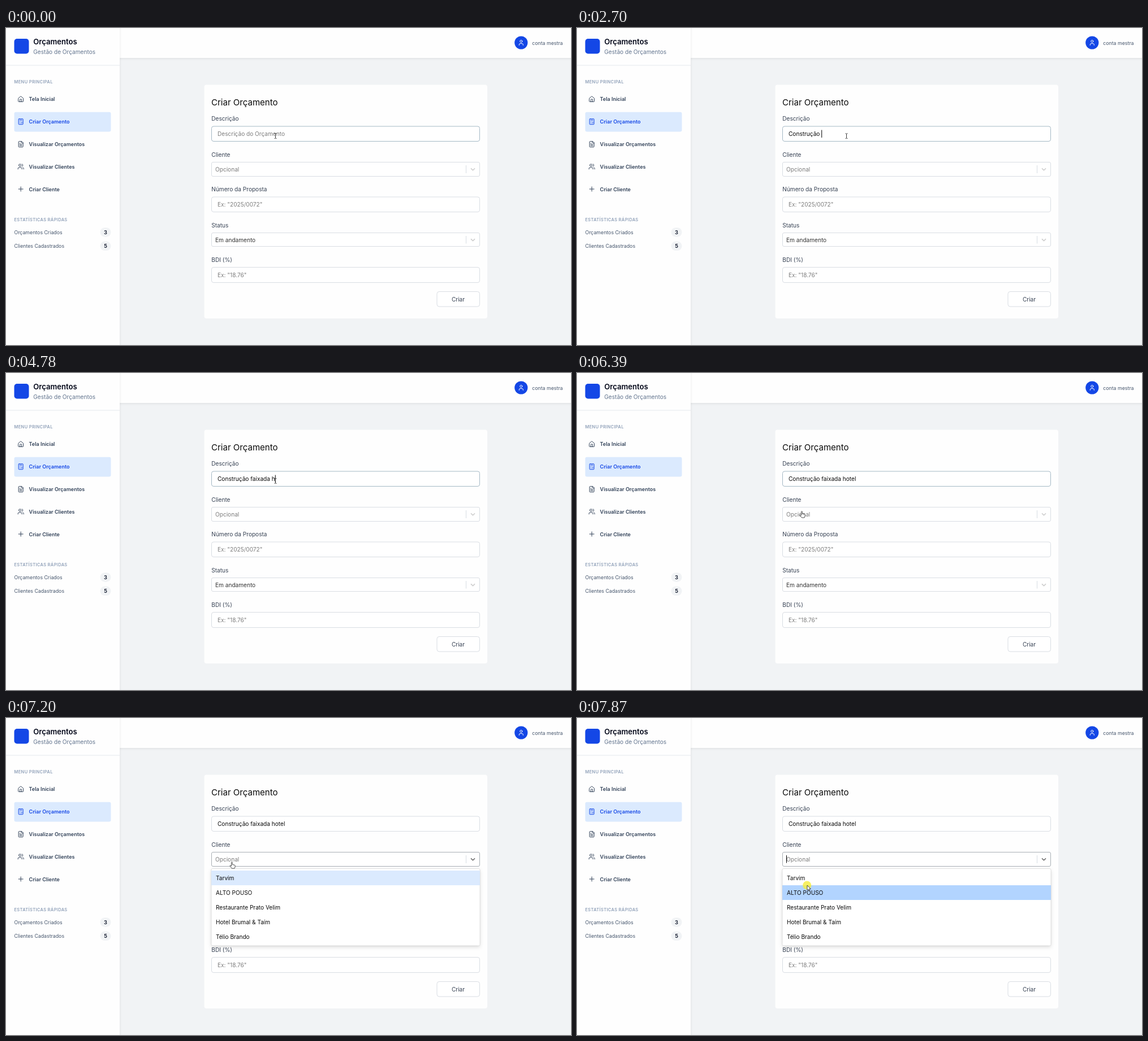
These frames come from a looping animation (999 by 561 pixels, 8000 ms). An HTML page:

```html
<!DOCTYPE html>
<html lang="pt-BR">
<head>
<meta charset="utf-8">
<title>Criar Orçamento</title>
<style>
  html, body { margin: 0; width: 100%; height: 100%; overflow: hidden; }
  svg { display: block; }
  text { font: 10.1px Inter, sans-serif; fill: #364153; white-space: pre; }
  .brand { font-size: 13.1px; font-weight: 600; fill: #020618; }
  .sub { fill: #62748e; }
  .head { font-size: 7.5px; font-weight: 600; letter-spacing: .33px; fill: #90a1b9; }
  .nav text { font-size: 9px; font-weight: 600; fill: #314158; }
  .nav .on { fill: #1447e6; }
  .small { font-size: 8.77px; fill: #45556c; }
  .count { font-size: 9.3px; font-weight: 600; fill: #0f172b; text-anchor: middle; }
  .title { font-size: 15.05px; fill: #0a0a0a; }
  .hint { fill: #7c7c7c; }
  .ink, #menu text { fill: #0a0a0a; }
  .icon { fill: none; stroke: #314158; stroke-width: 2; stroke-linecap: round; stroke-linejoin: round; }
  .box { fill: #fff; stroke: #d9dde3; }
  .chevron { fill: none; stroke: #ccc; stroke-width: 1.5; stroke-linecap: round; stroke-linejoin: round; }
  .pointer { fill: #fff; stroke: #222; stroke-width: .8; stroke-linejoin: round; }
</style>
</head>
<body>
<svg width="999" height="561" viewBox="0 0 999 561">
  <defs>
    <filter id="soft" x="-20%" y="-20%" width="140%" height="140%">
      <feDropShadow dx="0" dy="1" stdDeviation="2" flood-opacity=".09"/>
    </filter>
    <filter id="drop" x="-5%" y="-10%" width="110%" height="125%">
      <feDropShadow dx="0" dy="2.5" stdDeviation="3" flood-opacity=".13"/>
    </filter>
  </defs>

  <rect width="999" height="561" fill="#f1f3f5"/>
  <rect x="190" y="-10" width="830" height="63" fill="#fefefe" filter="url(#soft)"/>
  <rect x="-20" y="-20" width="221" height="601" fill="#fefefe" filter="url(#soft)"/>

  <rect x="14.5" y="19" width="26" height="26.5" rx="5" fill="#1447e6"/>
  <text class="brand" x="48.3" y="28.8">Orçamentos</text>
  <text class="sub" x="48.3" y="45.9">Gestão de Orçamentos</text>
  <path d="M0 66h201" stroke="#e5e8ec"/>

  <circle cx="910.8" cy="26" r="11.6" fill="#1447e6"/>
  <g class="icon" style="stroke:#fff" transform="translate(904.8 20) scale(.5)">
    <path d="M19 21v-2a4 4 0 0 0-4-4H9a4 4 0 0 0-4 4v2"/><circle cx="12" cy="7" r="4"/>
  </g>
  <text class="small" x="984.5" y="29.6" text-anchor="end">conta mestra</text>

  <text class="head" x="14.5" y="98.2">MENU PRINCIPAL</text>
  <rect x="14.5" y="148.7" width="171" height="34.8" rx="3" fill="#dbeafe"/>
  <g class="nav">
    <text x="40.6" y="129.3">Tela Inicial</text>
    <text x="40.6" y="169" class="on">Criar Orçamento</text>
    <text x="40.6" y="209.1">Visualizar Orçamentos</text>
    <text x="40.6" y="248.8">Visualizar Clientes</text>
    <text x="40.6" y="288.5">Criar Cliente</text>
  </g>
  <g class="icon">
    <path transform="translate(20.2 120) scale(.5)" d="M15 21v-8a1 1 0 0 0-1-1h-4a1 1 0 0 0-1 1v8M3 10a2 2 0 0 1 .7-1.5l7-6a2 2 0 0 1 2.6 0l7 6A2 2 0 0 1 21 10v9a2 2 0 0 1-2 2H5a2 2 0 0 1-2-2z"/>
    <path transform="translate(20.2 159.7) scale(.5)" stroke="#1447e6" d="M6 2h12a2 2 0 0 1 2 2v16a2 2 0 0 1-2 2H6a2 2 0 0 1-2-2V4a2 2 0 0 1 2-2zM8 6h8M16 14v4M16 10h.01M12 10h.01M8 10h.01M12 14h.01M8 14h.01M12 18h.01M8 18h.01"/>
    <path transform="translate(20.2 199.7) scale(.5)" d="M15 2H6a2 2 0 0 0-2 2v16a2 2 0 0 0 2 2h12a2 2 0 0 0 2-2V7zM14 2v4a2 2 0 0 0 2 2h4M10 9H8M16 13H8M16 17H8"/>
    <path transform="translate(20.2 239.3) scale(.5)" d="M16 21v-2a4 4 0 0 0-4-4H6a4 4 0 0 0-4 4v2M5 7a4 4 0 0 1 8 0a4 4 0 0 1-8 0M22 21v-2a4 4 0 0 0-3-3.9M16 3.1a4 4 0 0 1 0 7.8"/>
    <path transform="translate(20.2 279) scale(.5)" d="M4 12h16M12 4v16"/>
  </g>

  <text class="head" x="14.5" y="341.9">ESTATÍSTICAS RÁPIDAS</text>
  <text class="small" x="14.5" y="364.6">Orçamentos Criados</text>
  <text class="small" x="14.5" y="389">Clientes Cadastrados</text>
  <g fill="#f1f3f5">
    <rect x="166.5" y="353.2" width="19" height="16.5" rx="8.2"/>
    <rect x="166.5" y="377.6" width="19" height="16.5" rx="8.2"/>
  </g>
  <text class="count" x="176" y="364.8">3</text>
  <text class="count" x="176" y="389.2">5</text>

  <rect x="350.5" y="100.5" width="500.5" height="413.5" rx="4" fill="#fefefe"/>
  <text class="title" x="363" y="137.2">Criar Orçamento</text>
  <text x="363.3" y="164.2">Descrição</text>
  <text x="363.3" y="227.9">Cliente</text>
  <text x="363.3" y="289.4">Número da Proposta</text>
  <text x="363.3" y="353">Status</text>
  <text x="363.3" y="414">BDI (%)</text>

  <g class="box">
    <rect id="field" x="363.5" y="174" width="474" height="26.5" rx="3.5"/>
    <rect id="client" x="363.5" y="237.5" width="474" height="25" rx="2.5"/>
    <rect x="363.5" y="299" width="474" height="26.5" rx="3.5"/>
    <rect x="363.5" y="362.5" width="474" height="24" rx="2.5"/>
    <rect x="363.5" y="423.5" width="474" height="27" rx="3.5"/>
    <rect x="762" y="466.5" width="75.5" height="26.5" rx="4"/>
    <path d="M813.5 243v14M813.5 368v13.5"/>
  </g>
  <path id="arrow" class="chevron" d="M822.4 248.7l3.1 3.1 3.1-3.1"/>
  <path class="chevron" d="M822.4 373.6l3.1 3.1 3.1-3.1"/>

  <text id="entry" x="374" y="191"></text>
  <text class="hint" x="370" y="253.7">Opcional</text>
  <text class="hint" x="374" y="316">Ex: "2025/0072"</text>
  <text x="370" y="378.6" style="fill:#333">Em andamento</text>
  <text class="hint" x="374" y="440.7">Ex: "18.76"</text>
  <text x="799.5" y="483.5" text-anchor="middle">Criar</text>

  <g id="menu">
    <rect x="363" y="266.5" width="475" height="136.5" rx="2.5" fill="#fff" stroke="#000" stroke-opacity=".1" filter="url(#drop)"/>
    <rect id="option" x="363" width="475" height="26"/>
  </g>
  <rect id="caret" width="1" height="13.5" fill="#000"/>

  <circle id="press" r="7.6" fill="#f5ec3c" fill-opacity=".8"/>
  <g id="cursor">
    <path id="beam" d="M-2-4.2h1.3L0-3.6.7-4.2H2M0-3.6V3.8M-2 4.4h1.3L0 3.8l.7.6H2" fill="none" stroke="#222" stroke-width=".9"/>
    <path id="tip" class="pointer" d="M0 0v9l2.1-1.9 1.4 3 1.4-.6-1.4-3h2.8z"/>
    <path id="hand" class="pointer" d="M-.9.2Q0-1.2.9.2v4l4 .9q1 .4.9 1.5l-.4 2.5-.8 1.9H-.1L-3.4 6.7q0-1.3 1.3-.8l1.2 1z"/>
  </g>
</svg>
<script>
const $ = id => document.getElementById(id);
const LOOP = 8000, OPEN = 6460, PHRASE = 'Construção faixada hotel';
const KEYS = [250, 580, 780, 980, 1180, 1310, 1510, 1910, 2240, 2370, 2700,
  3180, 3250, 3450, 3710, 3850, 4050, 4120, 4380, 4780, 4980, 5120, 5250, 5380];

['Tarvim', 'ALTO POUSO', 'Restaurante Prato Velim', 'Hotel Brumal & Taím', 'Télio Brando']
  .forEach((name, i) => {
    const label = document.createElementNS('http://www.w3.org/2000/svg', 'text');
    label.setAttribute('x', 371);
    label.setAttribute('y', 286.7 + 26 * i);
    label.textContent = name;
    $('menu').append(label);
  });

const show = (id, on) => $(id).style.display = on ? '' : 'none';
const move = (id, x, y) => $(id).setAttribute('transform', `translate(${x} ${y})`);
const ease = (t, from, to) => {
  const p = Math.min(1, Math.max(0, (t - from) / (to - from)));
  return p * p * (3 - 2 * p);
};

function draw(t) {
  const typed = KEYS.filter(k => k <= t).length;
  const open = t >= OPEN, focused = t >= 6530, active = t >= 7870;
  const entry = $('entry');
  entry.textContent = typed ? PHRASE.slice(0, typed) : 'Descrição do Orçamento';
  entry.setAttribute('class', typed ? 'ink' : 'hint');

  $('field').style.stroke = open ? '' : '#a5b9c5';
  $('client').style.stroke = focused ? '#a9afb5' : '';
  $('arrow').style.stroke = focused ? '#666' : '';
  show('menu', open);
  $('option').setAttribute('y', active ? 296 : 270);
  $('option').setAttribute('fill', active ? '#b2d4ff' : '#dbeafe');

  show('caret', open ? t < 7000 || t >= 7470 : typed && t < 5910);
  if (open) move('caret', 370, 243);
  else move('caret', 374 + entry.getComputedTextLength(), 180.5);

  const toClient = ease(t, 5920, 6385), toOption = ease(t, 6960, 7800);
  const x = 476.5 - 79 * toClient + 9.5 * toOption;
  const y = 191 + 54 * toClient + 51 * toOption;
  const beam = y < 201, hand = y >= 237 && y < 263;
  move('cursor', x, y);
  move('press', x - .3, y);
  show('beam', beam);
  show('hand', hand);
  show('tip', !beam && !hand);
  show('press', open && !focused || t >= 7800);
}

function tick() {
  draw(performance.now() % LOOP);
  requestAnimationFrame(tick);
}
tick();
</script>
</body>
</html>
```
